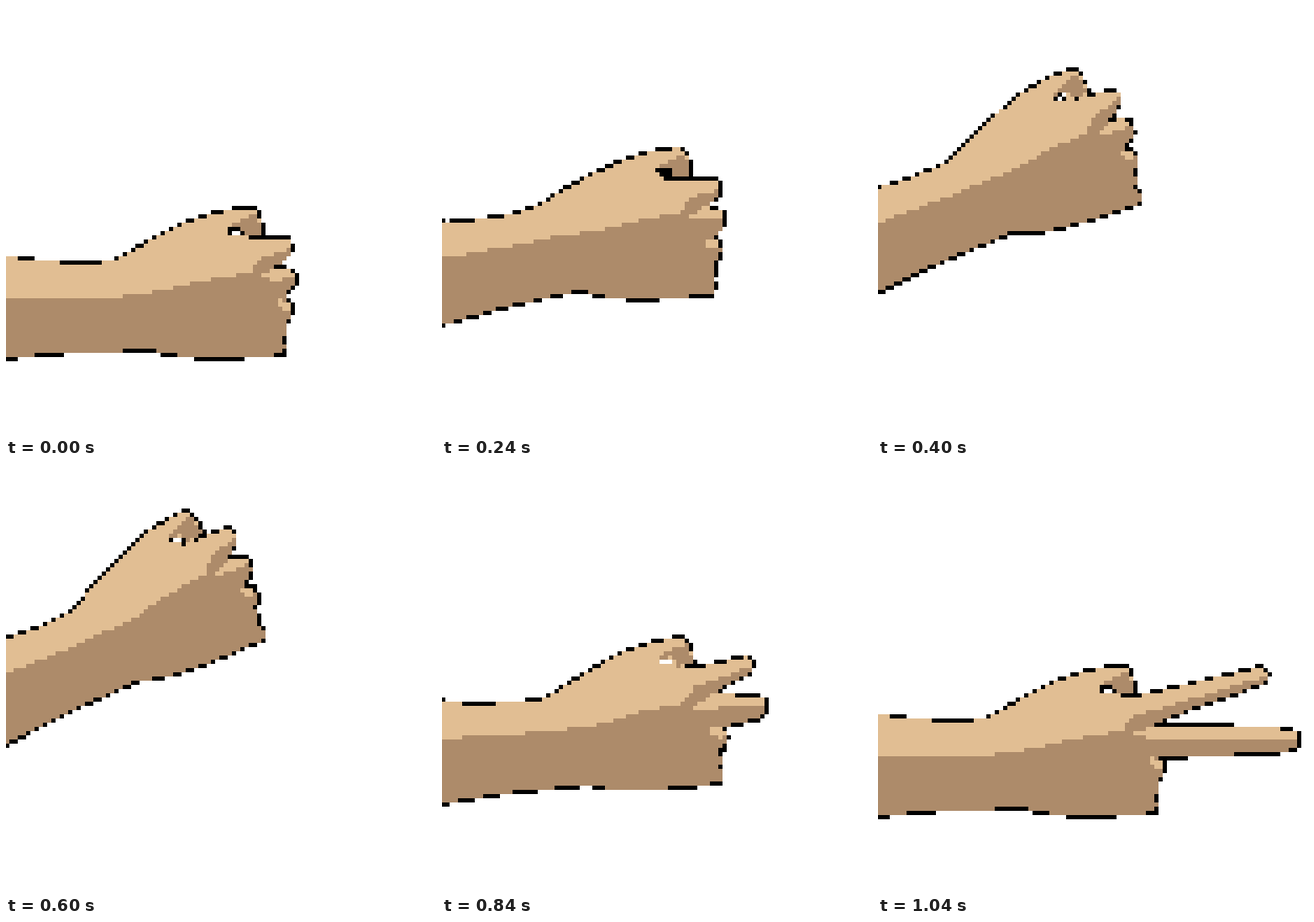
An HTML page with a canvas that plays this animation: 512x512 px, repeating every 1.6 s.

```html
<!DOCTYPE html>
<html lang="en">
<head>
<meta charset="utf-8">
<title>Arm throwing a hand sign</title>
<style>
  html, body { margin: 0; width: 100%; height: 100%; overflow: hidden; background: #fff; }
  canvas { display: block; width: 100%; height: 100%; }
</style>
</head>
<body>
<canvas id="stage" width="512" height="512"></canvas>
<script>
const SIZE = 512, CELL = 5, LOOP = 1600, STEP = 40, LINE = 3;
const LEFT = -1, TOP = -2;                       // corner of the first cell
const WHITE = '#fff', BLACK = '#000', LIGHT = '#e1be93', DARK = '#ad8b6a';
const ctx = document.getElementById('stage').getContext('2d');

// Time in ms, then forearm and hand angle in degrees, counter-clockwise
const SWING = [
  [0, 0, 0], [240, 10.7, 0.6], [480, 23.2, 20.6], [560, 23.2, 20.6],
  [760, 13, 16.5], [840, 4.1, 2.9], [940, -3.4, -5], [1040, 0, 0], [LOOP, 0, 0]
];
const ELBOW = [-217, 364], WRIST = [158, 357.5];

// Outlines in the level pose
const ARM_TOP = [[-80, 296], [0, 298.5], [34, 303.5], [94, 306.5], [129, 303], [154, 290],
  [199, 266], [240, 249.5], [290, 241], [302, 252], [305, 273]];
const THUMB_WEB = [[285, 276], [264, 276]];
const FIST_FRONT = [[310, 300], [326, 350], [331, 378], [333, 388], [329, 396], [333, 404], [329, 414]];
const ARM_BASE = [[329, 415], [250, 418.5], [199, 415], [172, 408.5], [159, 410], [69, 412.5], [8, 418], [-80, 424]];
const RIDGE = [[290, 318], [240, 326], [190, 338], [145, 344], [110, 347.5], [-80, 346]];
const THUMB_SHADE = [[264, 262], [284, 252], [299, 248], [305, 273], [285, 274], [280, 262], [264, 270]];
const THUMB_HOLE = [[265, 265], [280, 265], [284, 272.5], [266, 272.5]];
const RING = [[325, 347], [338, 352], [340, 362], [336, 374], [325, 378]];
const RING_LIGHT = [[323, 349], [338, 352], [340, 361], [330, 362], [323, 356]];

// Finger points carry a third value: their share of the finger's reach
const INDEX = {
  reach: [124, -35],
  shape: [[262, 276, 0], [310, 277, 0], [334, 277, 1], [340, 284, 1], [338, 295, 1],
    [326, 306, 0.25], [312, 318, 0], [288, 319, 0]],
  shade: [[340, 287, 1], [338, 295, 1], [326, 306, 0.25], [312, 318, 0],
    [290, 325, 0], [288, 320, 0], [306, 299, 0], [328, 293, 0.25]]
};
const MIDDLE = {
  reach: [157, 3],
  shape: [[300, 316, 0], [316, 310, 0.15], [334, 313, 1], [344, 319, 1], [344, 333, 1],
    [336, 341, 0.9], [330, 348, 0.1], [300, 350, 0]],
  light: [[304, 325, 0], [304, 315, 0], [316, 310, 0.15], [334, 313, 1],
    [344, 319, 1], [343, 324, 1], [326, 326, 0.2]]
};

const clamp = v => Math.max(0, Math.min(1, v));
const smooth = v => v * v * (3 - 2 * v);
const mix = (a, b, k) => a + (b - a) * k;

// Smooth value of one column of SWING, level at turning points
function swing(t, col) {
  const last = SWING.length - 1;
  const chord = i => (SWING[i + 1][col] - SWING[i][col]) / (SWING[i + 1][0] - SWING[i][0]);
  const slope = i => {
    if (i === 0 || i === last) return 0;
    const a = chord(i - 1), b = chord(i);
    return a * b <= 0 ? 0 : 2 * a * b / (a + b);
  };
  let i = 0;
  while (i < last - 1 && t >= SWING[i + 1][0]) i++;
  const d = SWING[i + 1][0] - SWING[i][0], u = (t - SWING[i][0]) / d, w = 1 - u;
  return mix(SWING[i][col], SWING[i + 1][col], smooth(u))
    + d * (slope(i) * u * w * w - slope(i + 1) * u * u * w);
}

function turn([x, y], from, to, deg) {
  const r = deg * Math.PI / 180, c = Math.cos(r), s = Math.sin(r);
  const dx = x - from[0], dy = y - from[1];
  return [to[0] + dx * c + dy * s, to[1] - dx * s + dy * c];
}

// Rounded line through a few points
function curve(points, parts = 6) {
  const at = i => points[Math.max(0, Math.min(points.length - 1, i))];
  const out = [];
  for (let i = 0; i < points.length - 1; i++) {
    for (let k = 0; k < parts; k++) {
      const u = k / parts;
      out.push([0, 1].map(n => {
        const [a, b, c, d] = [-1, 0, 1, 2].map(j => at(i + j)[n]);
        return b + u / 2 * (c - a + u * (2 * a - 5 * b + 4 * c - d + u * (3 * (b - c) + d - a)));
      }));
    }
  }
  return [...out, at(points.length - 1)];
}

function inside(x, y, poly) {
  let hit = false;
  poly.forEach(([ax, ay], i) => {
    const [bx, by] = poly[(i + 1) % poly.length];
    if ((ay > y) !== (by > y) && x < ax + (y - ay) / (by - ay) * (bx - ax)) hit = !hit;
  });
  return hit;
}

function nearEdge(x, y, poly, reach) {
  return poly.some(([ax, ay], i) => {
    const [bx, by] = poly[(i + 1) % poly.length], dx = bx - ax, dy = by - ay;
    const k = clamp(((x - ax) * dx + (y - ay) * dy) / (dx * dx + dy * dy || 1));
    return Math.hypot(x - ax - k * dx, y - ay - k * dy) < reach;
  });
}

// Colour each cell whose centre passes the test
function paint(poly, color, test = inside) {
  const xs = poly.map(p => p[0]), ys = poly.map(p => p[1]);
  const first = (v, edge) => Math.max(0, Math.floor((v - LINE - edge) / CELL));
  const right = Math.min(SIZE, Math.max(...xs) + LINE), bottom = Math.min(SIZE, Math.max(...ys) + LINE);
  ctx.fillStyle = color;
  for (let y = TOP + CELL * first(Math.min(...ys), TOP); y < bottom; y += CELL) {
    for (let x = LEFT + CELL * first(Math.min(...xs), LEFT); x < right; x += CELL) {
      if (test(x + CELL / 2, y + CELL / 2, poly)) ctx.fillRect(x, y, CELL, CELL);
    }
  }
}

function draw(t) {
  const arm = swing(t, 1), hand = swing(t, 2);
  const spread = clamp((t - 760) / 280), lift = 5 * clamp(arm / 5);
  const wrist = turn(WRIST, ELBOW, ELBOW, arm);

  // The skin bends gradually around the wrist
  const grip = x => smooth(clamp((x - 110) / 70));
  const pose = points => points.map(p => {
    const a = turn(p, ELBOW, ELBOW, arm), h = turn(p, WRIST, wrist, hand);
    return [mix(a[0], h[0], grip(p[0])), mix(a[1], h[1], grip(p[0]))];
  });
  const extend = (points, [dx, dy]) =>
    pose(points.map(([x, y, share]) => [x + dx * share * spread, y + dy * share * spread]));

  const top = curve(pose(ARM_TOP)), web = pose(THUMB_WEB);
  const ridge = pose(RIDGE.map(([x, y]) => [x, y - lift * (1 - grip(x))]));
  const body = [...top, ...web, ...curve(pose(FIST_FRONT)), ...curve(pose(ARM_BASE))];
  const ring = pose(RING);
  const middle = extend(MIDDLE.shape, MIDDLE.reach);
  const index = extend(INDEX.shape, INDEX.reach);
  const hole = pose(THUMB_HOLE);

  ctx.fillStyle = WHITE;
  ctx.fillRect(0, 0, SIZE, SIZE);

  // Fills cover the inner half of the outline
  const rim = (x, y, poly) => nearEdge(x, y, poly, LINE);
  [body, ring, middle, index].forEach(poly => paint(poly, BLACK, rim));

  paint(body, DARK);
  paint([...top, ...web, ...curve(ridge)], LIGHT);
  paint(ring, DARK);
  paint(pose(RING_LIGHT), LIGHT);
  paint(middle, DARK);
  paint(extend(MIDDLE.light, MIDDLE.reach), LIGHT);
  paint(index, LIGHT);
  paint(extend(INDEX.shade, INDEX.reach), DARK);
  paint(pose(THUMB_SHADE), DARK);
  paint(hole, BLACK);
  paint(hole, WHITE, (x, y, poly) => inside(x, y, poly) && !nearEdge(x, y, poly, LINE / 2));
}

const start = performance.now();
let shown = -1;

function tick() {
  const t = Math.floor(((performance.now() - start) % LOOP) / STEP) * STEP;
  if (t !== shown) draw(shown = t);
  requestAnimationFrame(tick);
}
tick();
</script>
</body>
</html>
```
